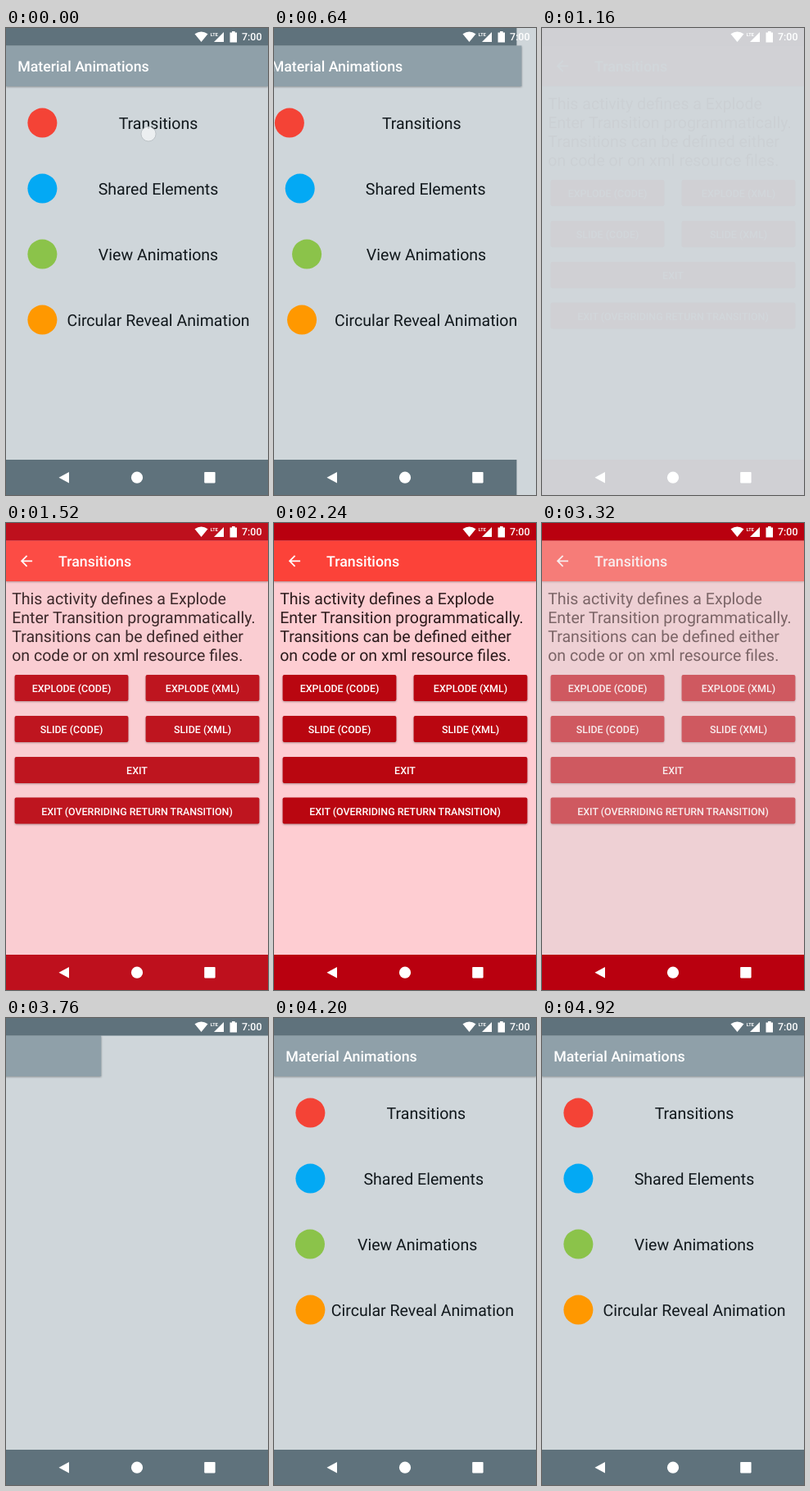
An HTML page that plays this animation: 320 by 569 pixels, repeating every 4.96 s.

```html
<!DOCTYPE html>
<html lang="en">
<head>
<meta charset="utf-8">
<title>Activity transition</title>
<style>
  html, body { margin: 0; width: 100%; height: 100%; overflow: hidden; background: #cfd6da; }
  svg { display: block; width: 100vw; height: 100vh; }
  text { font-family: Roboto, sans-serif; text-rendering: geometricPrecision; }
  .title { font-size: 17.78px; font-weight: 500; fill: #fff; }
  .large { font-size: 19.56px; }
  .label { font-size: 12.44px; font-weight: 500; fill: #fff; }
  .mid { text-anchor: middle; }
  .raised { filter: drop-shadow(0 1px 1px rgba(0, 0, 0, .32)); }
</style>
</head>
<body>
<svg viewBox="0 0 320 569" preserveAspectRatio="none">
  <rect width="320" height="569" fill="#cfd6da"/>
  <rect id="pink" width="320" height="569" fill="#fecdd2"/>
  <g id="list"></g>
  <g id="detail"></g>
  <g id="grayBars" fill="#5f727c">
    <rect width="320" height="21.5"/><rect y="526" width="320" height="43"/>
  </g>
  <g id="redBars" fill="#b9000f">
    <rect width="320" height="21.5"/><rect y="526" width="320" height="43"/>
  </g>
  <g fill="#fff">
    <path d="M238.5 17L230.5 7.3Q238.5 1.7 246.5 7.3Z"/>
    <path d="M266 5V17H254Z"/>
    <text x="249.8" y="9.6" font-size="5.5" font-weight="700">LTE</text>
    <path d="M276 4h3.6v1.4h2.4v12h-8.5v-12h2.5Z"/>
    <text x="288" y="15.4" class="label">7:00</text>
    <path d="M64.5 547.7L77 541V554.6Z"/>
    <circle cx="160" cy="547.7" r="7.1"/>
    <rect x="242.2" y="541" width="13.4" height="13.4" rx=".8"/>
  </g>
  <circle id="touch" cx="174" cy="129" r="9" fill="#f2f4f5" fill-opacity=".82" stroke="#a9b0b5" stroke-opacity=".6"/>
</svg>
<script>
const LOOP = 4960, DURATION = 500, WIDTH = 320;
const EXIT = 500, REENTER = 3636;
const FADE_IN = 1110, FADE_OUT = 3100, BACK_OUT = 3130, CLOSED = 3600;
const $ = id => document.getElementById(id);

const clamp = u => Math.max(0, Math.min(1, u));
const accelerate = u => u * u;
const decelerate = u => 1 - (1 - u) ** 2;
const smooth = u => (1 - Math.cos(Math.PI * u)) / 2;
const progress = (t, start, ease) => ease(clamp((t - start) / DURATION));

// Side propagation: parts far from the right edge and the middle row go first.
const delayOf = (x, y) => (445 - (WIDTH - x) - Math.abs(285 - y)) * DURATION / 3 / WIDTH;

const parts = [];
function addPart(x, y, markup) {
  const el = document.createElementNS('http://www.w3.org/2000/svg', 'g');
  el.innerHTML = markup;
  $('list').append(el);
  parts.push({ el, delay: delayOf(x, y) });
}

const toolbar = color => `<rect class="raised" y="21.5" width="320" height="49.5" fill="${color}"/>`;

addPart(160, 46, toolbar('#8fa0a9') + '<text x="14.2" y="53" class="title">Material Animations</text>');
[
  ['Transitions', '#f44336'],
  ['Shared Elements', '#03a9f4'],
  ['View Animations', '#8bc34a'],
  ['Circular Reveal Animation', '#ff9800']
].forEach(([name, color], i) => {
  const y = 115.6 + 80 * i;
  addPart(44, y, `<circle cx="44.4" cy="${y}" r="18" fill="${color}"/>`);
  addPart(186, y, `<text x="186" y="${y + 7.8}" class="large mid" fill="#11181c">${name}</text>`);
});

const button = (x, y, w, name) =>
  `<rect class="raised" x="${x}" y="${y}" width="${w}" height="32" rx="2" fill="#b90610"/>
   <text x="${x + w / 2}" y="${y + 21}" class="label mid">${name}</text>`;

const lines = [
  'This activity defines a Explode',
  'Enter Transition programmatically.',
  'Transitions can be defined either',
  'on code or on xml resource files.'
];
$('detail').innerHTML = toolbar('#fc4239') +
  `<path transform="translate(14.3 35.7) scale(.889)" fill="#fff"
     d="M20 11H7.83l5.59-5.59L12 4l-8 8 8 8 1.41-1.41L7.83 13H20z"/>
   <text x="64" y="53" class="title">Transitions</text>` +
  lines.map((s, i) => `<text x="7.2" y="${99 + 22.9 * i}" class="large" fill="#2c1b1c">${s}</text>`).join('') +
  button(10.6, 185, 138.8, 'EXPLODE (CODE)') + button(170.6, 185, 138.8, 'EXPLODE (XML)') +
  button(10.6, 235, 138.8, 'SLIDE (CODE)') + button(170.6, 235, 138.8, 'SLIDE (XML)') +
  button(10.6, 285, 298.8, 'EXIT') +
  button(10.6, 334.6, 298.8, 'EXIT (OVERRIDING RETURN TRANSITION)');

const shift = (el, x) => el.setAttribute('transform', `translate(${x} 0)`);
const fade = (el, v) => el.setAttribute('opacity', v);

function slide(t, delay) {
  return t < REENTER
    ? -WIDTH * progress(t, EXIT + delay, accelerate)
    : -WIDTH * (1 - progress(t, REENTER + delay, decelerate));
}

function render(t) {
  const shown = progress(t, FADE_IN, smooth);
  for (const { el, delay } of parts) shift(el, slide(t, delay));
  shift($('grayBars'), t < CLOSED ? slide(t, delayOf(160, 10)) : 0);
  fade($('redBars'), t < CLOSED ? shown : 0);
  fade($('detail'), shown * (1 - progress(t, FADE_OUT, smooth)));
  fade($('pink'), shown * (1 - progress(t, BACK_OUT, smooth)));
  fade($('touch'), t < 160 ? 1 : 0);
}

const begin = performance.now();
function tick() {
  render((performance.now() - begin) % LOOP);
  requestAnimationFrame(tick);
}
tick();
</script>
</body>
</html>
```
